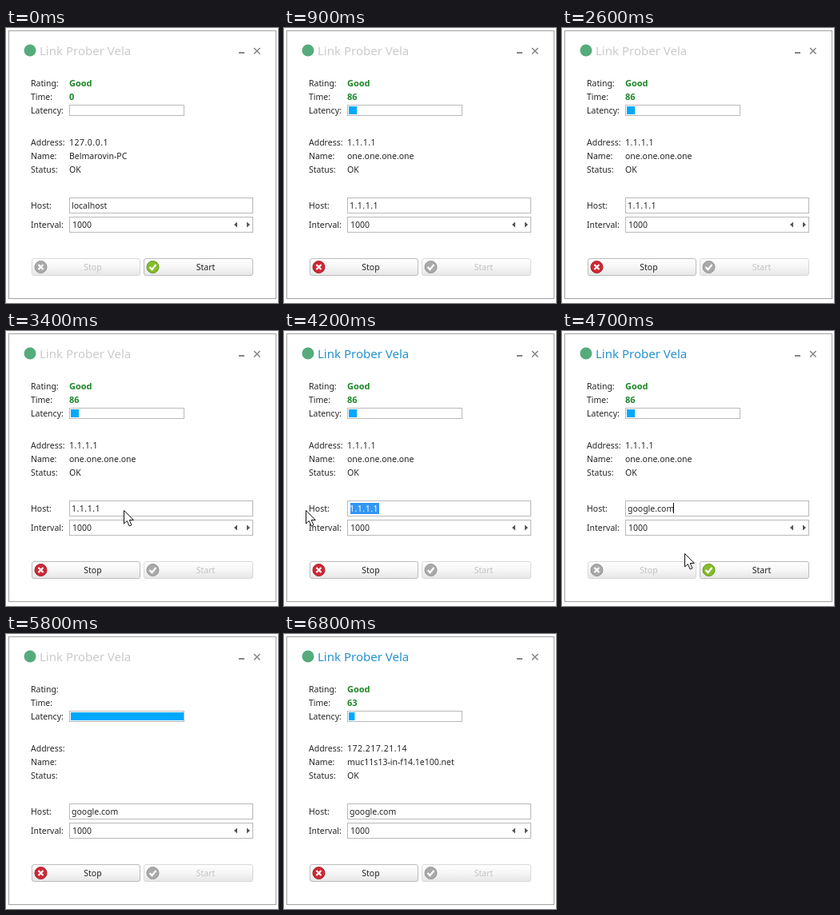
An HTML page for the animation above (7200 ms loop, 340 by 344 pixels).

```html
<!DOCTYPE html>
<html lang="en">
<head>
<meta charset="utf-8">
<title>Link Prober Vela</title>
<style>
  html, body { margin: 0; width: 100%; height: 100%; overflow: hidden; background: #fff; }
  svg { display: block; width: 340px; height: 344px; }
  text { font: 10.5px "Noto Sans", sans-serif; fill: #262626; white-space: pre; }
  .title { font-size: 15px; }
  .bold { font-weight: 700; font-size: 11px; fill: #1c8526; }
  .ip { letter-spacing: .5px; }
  .mid { text-anchor: middle; }
  .box { fill: #fff; stroke: #b9b9b9; }
  .glyph { fill: none; stroke: #fff; stroke-width: 2.2; }
</style>
</head>
<body>
<svg id="stage" viewBox="0 0 340 344">
  <defs>
    <linearGradient id="face" x2="0" y2="1">
      <stop offset="0" stop-color="#fff"/>
      <stop offset=".5" stop-color="#f6f6f6"/>
      <stop offset="1" stop-color="#e6e6e6"/>
    </linearGradient>
    <clipPath id="selClip"><rect id="selArea" y="215" height="14"/></clipPath>
  </defs>
  <rect width="340" height="344" fill="#fff"/>
  <rect x="3.5" y="3.5" width="334" height="335" fill="#fff" stroke="#a3a3a3"/>
  <circle cx="30" cy="28" r="7.5" fill="#56ab7c"/>
  <path d="M291 31h7" stroke="#858585" stroke-width="2"/>
  <path d="M310 25l7.5 7.5M317.500 25l-7.500 7.500" stroke="#858585" stroke-width="1.5"/>
</svg>
<script>
const NS = "http://www.w3.org/2000/svg";
const stage = document.getElementById("stage");
const selArea = document.getElementById("selArea");
const LOOP = 7200, STEP = 100, HOST_X = 82;

function add(tag, attrs, parent = stage) {
  const node = document.createElementNS(NS, tag);
  for (const key in attrs) node.setAttribute(key, attrs[key]);
  return parent.appendChild(node);
}
function label(x, y, str = "", cls = "") {
  const node = add("text", { x, y, class: cls });
  node.textContent = str;
  return node;
}
function set(node, attrs) {
  for (const key in attrs) node.setAttribute(key, attrs[key]);
}
function show(node, on) {
  node.setAttribute("visibility", on ? "visible" : "hidden");
}

const title = label(42, 34, "Link Prober Vela", "title");
const rows = { Rating: 73, Time: 90, Latency: 107, Address: 147, Name: 164, Status: 181, Host: 226, Interval: 250 };
for (const name in rows) label(31, rows[name], name + ":");

const value = {};
for (const name of ["Rating", "Time", "Address", "Name", "Status"]) {
  const cls = name === "Address" ? "ip" : rows[name] < 100 ? "bold" : "";
  value[name] = label(79, rows[name], "", cls);
}

add("rect", { class: "box", x: 79.5, y: 96.5, width: 143, height: 13 });
const bar = add("rect", { x: 81, y: 98, height: 10, fill: "#00a8ff" });
for (const y of [212.5, 236.5]) add("rect", { class: "box", x: 79.5, y, width: 229, height: 19 });
label(83, 250, "1000");
add("path", { d: "M289 242.500v7l-4 -3.500zM301 242.500v7l4 -3.500z", fill: "#555" });

const host = label(HOST_X, 226);
const sel = add("rect", { y: 215, height: 14, fill: "#3296f5" });
const selText = label(HOST_X, 226, "1.1.1.1", "ip");
set(selText, { "clip-path": "url(#selClip)", style: "fill:#fff" });
const caret = add("rect", { y: 215, width: 1, height: 13, fill: "#111" });

function button(x, width, name, textX, color, rim, mark) {
  const face = add("rect", { x: x + .5, y: 288.5, width, height: 21, rx: 2.5, fill: "url(#face)" });
  const disc = add("circle", { cx: x + 11.5, cy: 299, r: 7.5 });
  add("path", { class: "glyph", d: mark, transform: `translate(${x + 11.5} 299)` });
  const text = label(textX, 303, name, "mid");
  return on => {
    set(face, { stroke: on ? "#bcbcbc" : "#d9d9d9" });
    set(disc, { fill: on ? color : "#a9a9a9", stroke: on ? rim : "#949494" });
    text.style.fill = on ? "#222" : "#c2c2c2";
  };
}
const stop = button(32, 135, "Stop", 108.5, "#cf2835", "#a51c28", "M-3 -3L3 3M3 -3L-3 3");
const start = button(172, 136, "Start", 249.5, "#85bd28", "#5f9417", "M-4 0L-1 3L4 -3");

const cursor = add("path", {
  d: "M.5 .5V17L4.300 13.500L7.200 20L10 18.700L7.200 12.500H12.300Z",
  fill: "#fff", stroke: "#111"
});

// time, x, y
const route = [
  [2800, 232, 284], [3400, 147, 224], [3500, 147, 224], [4200, 27, 224],
  [4700, 153, 278], [5000, 212, 302], [5400, 216, 306]
];
function cursorAt(t) {
  const i = route.findIndex(p => p[0] > t);
  if (i < 1) return null;
  const [t0, x0, y0] = route[i - 1], [t1, x1, y1] = route[i];
  const k = (t - t0) / (t1 - t0);
  return [x0 + (x1 - x0) * k, y0 + (y1 - y0) * k];
}

const results = {
  local: { Rating: "Good", Time: 0, Address: "127.0.0.1", Name: "Belmarovin-PC", Status: "OK" },
  one: { Rating: "Good", Time: 86, Address: "1.1.1.1", Name: "one.one.one.one", Status: "OK" },
  none: {},
  web: { Rating: "Good", Time: 63, Address: "172.217.21.14", Name: "muc11s13-in-f14.1e100.net", Status: "OK" }
};
const within = (t, ...spans) => spans.some(([a, b]) => t >= a && t < b);

function draw(t) {
  const phase = t < 900 ? "local" : t < 5200 ? "one" : t < 6000 ? "none" : "web";
  const data = results[phase];
  for (const name in value) value[name].textContent = data[name] ?? "";
  set(bar, { width: phase === "none" ? 141 : data.Time * .117 });

  const idle = within(t, [0, 1000], [2600, 3500], [5800, 6100]);
  title.style.fill = idle ? "#cbcbcb" : "#2492cf";

  const typed = Math.max(0, (t - 4200) / STEP * 2);
  host.textContent = t < 900 ? "localhost" : typed ? "google.com".slice(0, typed) : "1.1.1.1";
  host.setAttribute("class", within(t, [900, 4300]) ? "ip" : "");

  const running = within(t, [900, 4300], [5200, LOOP]);
  stop(running);
  start(!running);

  const end = HOST_X + host.getComputedTextLength();
  show(caret, within(t, [1100, 1600], [2100, 2600], [3500, 3600], [4300, 5800], [6300, 6800]));
  set(caret, { x: Math.round(end) - 1 });

  const pos = cursorAt(t);
  show(cursor, pos);
  if (pos) set(cursor, { transform: `translate(${pos[0]} ${pos[1]})` });

  const left = pos ? Math.max(HOST_X + 1, pos[0]) : end;
  const span = { x: left, width: Math.max(0, end + 1 - left) };
  const selecting = within(t, [3500, 4300]) && left < end;
  set(sel, span);
  set(selArea, span);
  show(sel, selecting);
  show(selText, selecting);
}

function tick(now) {
  draw(Math.floor(now % LOOP / STEP) * STEP);
  requestAnimationFrame(tick);
}
draw(0);
requestAnimationFrame(tick);
</script>
</body>
</html>
```
